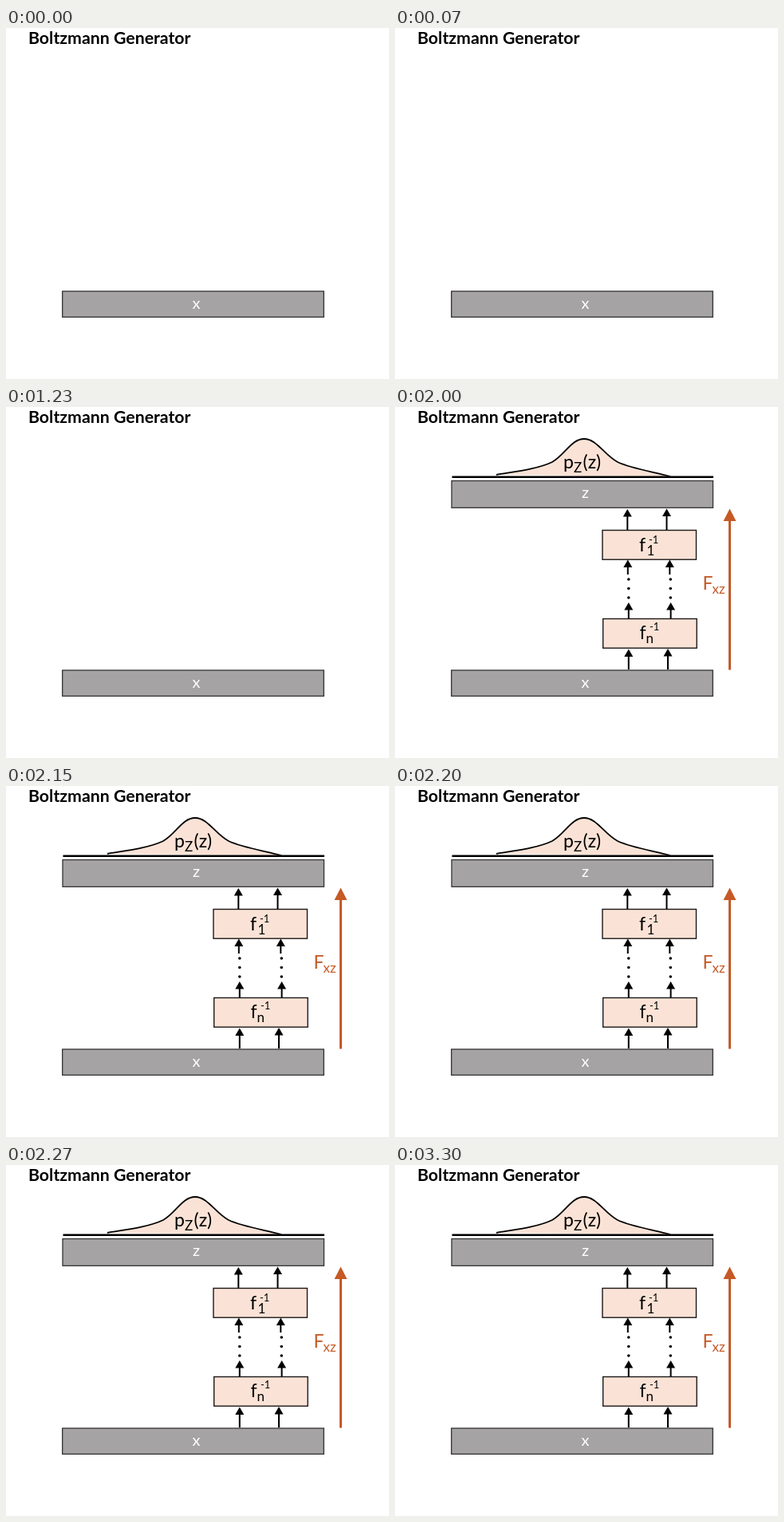
An HTML page that plays this animation: 480x440 px, repeating every 3990 ms.

```html
<!DOCTYPE html>
<html lang="en">
<head>
<meta charset="utf-8">
<title>Boltzmann Generator</title>
<style>
  html, body { margin: 0; width: 100%; height: 100%; overflow: hidden; background: #fff; }
  svg { display: block; width: 480px; height: 440px; font-family: Lato, "Open Sans", sans-serif; }
  .title { font-size: 21.3px; font-weight: 700; }
  .bar { fill: #a5a3a4; stroke: #333; stroke-width: 1.3; }
  .bar-label { font-size: 20px; fill: #fff; text-anchor: middle; }
  .box { fill: #fae3d6; stroke: #1c1817; stroke-width: 1.4; }
  .math { font-size: 23px; }
  .sub { font-size: 17px; }
  .sup { font-size: 13px; }
  .shaft { stroke: #000; stroke-width: 2; }
  .flow { animation: show 3990ms step-end infinite; }
  @keyframes show {
    0% { visibility: hidden; }
    50.1253% { visibility: visible; }
    100% { visibility: visible; }
  }
</style>
</head>
<body>
<svg viewBox="0 0 480 440">
  <defs>
    <path id="head" d="M0 0L5.5 9.5H-5.5Z"/>
    <g id="dots">
      <circle r="1.8"/><circle cy="11.5" r="1.8"/><circle cy="23" r="1.8"/>
    </g>
  </defs>

  <text class="title" x="28" y="20">Boltzmann Generator</text>
  <rect class="bar" x="70.7" y="330" width="327.6" height="32.4"/>
  <text class="bar-label" x="238.5" y="352">x</text>

  <g class="flow">
    <path fill="#fae3d6" d="M127 85C150 81 178 78 197 69C213 60 221 40 237 40C253 40 262 60 279 69C296 77 322 81 345 87Z"/>
    <path fill="none" stroke="#000" stroke-width="1.8" d="M127 85C150 81 178 78 197 69C213 60 221 40 237 40C253 40 262 60 279 69C296 77 322 81 345 87"/>
    <path stroke="#000" stroke-width="2.6" d="M71.5 87.8H399"/>
    <g class="math">
      <text x="211" y="77">p</text>
      <text class="sub" x="224" y="82">Z</text>
      <text x="235.5" y="77">(z)</text>
    </g>

    <rect class="bar" x="71" y="92.5" width="327.5" height="33.8"/>
    <text class="bar-label" x="238.5" y="114">z</text>

    <rect class="box" x="260" y="154.5" width="117.5" height="36.7"/>
    <g class="math">
      <text x="306" y="181">f</text>
      <text class="sub" x="315.5" y="186">1</text>
      <text class="sup" x="318" y="171">-1</text>
    </g>

    <rect class="box" x="260.7" y="265.5" width="117.5" height="36.7"/>
    <g class="math">
      <text x="306.5" y="291">f</text>
      <text class="sub" x="314.5" y="296">n</text>
      <text class="sup" x="319" y="280">-1</text>
    </g>

    <g id="arrows"></g>
    <use href="#dots" x="292.8" y="216"/>
    <use href="#dots" x="345.3" y="216"/>

    <g fill="#c55a27">
      <path d="M418 329.5V142H421V329.5ZM419.5 127.5L427.5 143H411.5Z"/>
      <text class="math" x="385.5" y="228.5">F</text>
      <text class="sub" x="397.5" y="234">xz</text>
    </g>
  </g>
</svg>
<script>
  // x, tip y, tail y
  const arrows = [
    [291.3, 128, 154], [340.5, 127.5, 154],
    [291.8, 191.5, 210], [344.3, 191.5, 210],
    [292.8, 245, 265], [345.6, 245, 265],
    [292.8, 303.5, 329], [342, 303, 329]
  ];
  document.getElementById('arrows').innerHTML = arrows.map(([x, tip, tail]) =>
    `<path class="shaft" d="M${x} ${tail}V${tip + 8}"/><use href="#head" x="${x}" y="${tip}"/>`
  ).join('');
</script>
</body>
</html>
```
